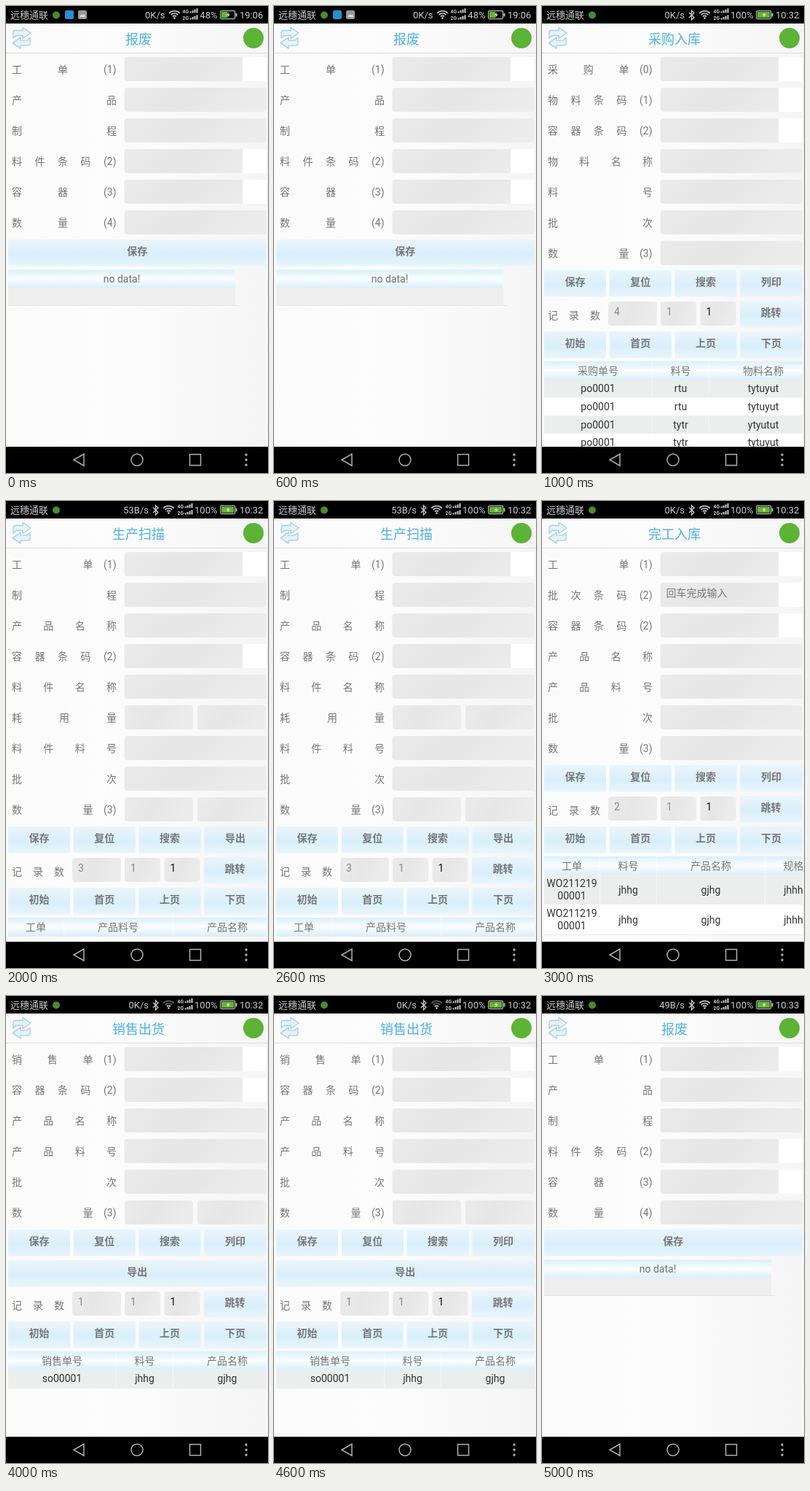
An HTML page for the animation above (6000 ms loop, 360 px wide and 640 px high).

```html
<!DOCTYPE html>
<html lang="zh-CN">
<head>
<meta charset="utf-8">
<title>移动仓库终端</title>
<style>
  html, body { margin: 0; width: 100%; height: 100%; overflow: hidden; background: #000; }
  svg { display: block; width: 360px; height: 640px; font: 14px Roboto, "Noto Sans CJK SC", "Noto Sans CJK", sans-serif; }
</style>
</head>
<body>
<svg id="stage" viewBox="0 0 360 640">
  <defs>
    <linearGradient id="page">
      <stop stop-color="#fafafa"/><stop offset=".35" stop-color="#fdfdfd"/><stop offset="1" stop-color="#f5f5f5"/>
    </linearGradient>
    <linearGradient id="field" x2="1" y2=".2">
      <stop stop-color="#ebebeb"/><stop offset=".5" stop-color="#e6e6e6"/><stop offset="1" stop-color="#ececec"/>
    </linearGradient>
    <linearGradient id="button" x2="0" y2="1">
      <stop stop-color="#ebf5fa"/><stop offset=".55" stop-color="#d9effb"/><stop offset="1" stop-color="#e9f5fb"/>
    </linearGradient>
    <linearGradient id="head" x2="0" y2="1">
      <stop stop-color="#d9f0fc"/><stop offset=".5" stop-color="#fbfdfe"/><stop offset="1" stop-color="#d9f0fc"/>
    </linearGradient>
    <clipPath id="tableClip"><path d="M2 24H358V604H2Z"/></clipPath>
  </defs>
</svg>
<script>
const ROW = 42, TOP = 66, SCENE_MS = 1000;
const rowY = i => TOP + ROW * i;

const rect = (x, y, w, h, fill, r = 0) =>
  `<rect x="${x}" y="${y}" width="${w}" height="${h}" rx="${r}" fill="${fill}"/>`;
const text = (x, y, str, fill = '#777', attrs = '') =>
  `<text x="${x}" y="${y}" fill="${fill}" ${attrs}>${str}</text>`;
const centered = (x, y, str, fill, attrs = '') =>
  text(x, y, str, fill, `text-anchor="middle" ${attrs}`);
const path = (d, attrs) => `<path d="${d}" ${attrs}/>`;

// Spreads characters evenly so the last one ends at `right`.
function spread(str, y, right) {
  const gap = (right - 8 - 14) / (str.length - 1);
  return [...str].map((c, i) => text(8 + gap * i, y, c)).join('');
}

function label(name, number, y, even) {
  if (!number) return spread(name, y, 152);
  const right = even || name.length === 4 ? 134 - (126 / name.length - 14) : 119.5;
  return spread(name, y, right) + text(134, y, `(${number})`);
}

const field = (x, y, w) => rect(x, y, w, 33, 'url(#field)', 4);
const fieldText = (x, y, str, fill = '#888') => text(x + 8, y + 19.3, str, fill);

// Row format: name, number, kind ("scan", "split" or none), value.
function formRow([name, number, kind, value], i, even) {
  const y = rowY(i) + 4;
  let out = label(name, number, y + 22.3, even);
  out += kind === 'split' ? field(163, y, 94) + field(263, y, 94) : field(162.5, y, 195);
  if (kind === 'scan') out += rect(325, y, 32.5, 33, '#fff');
  if (value) out += fieldText(162.5, y, value, '#777');
  return out;
}

function button(x, y, w, str) {
  return rect(x, y + 2, w, 36.5, 'url(#button)', 2) +
    centered(x + w / 2, y + 23.3, str, '#777', 'font-weight="bold"');
}
function buttons(names, i) {
  const w = names.length === 1 ? 354.5 : 85;
  return names.map((n, k) => button(3 + 89.8 * k, rowY(i), w, n)).join('');
}

function records(count, i) {
  const y = rowY(i);
  return spread('记录数', y + 26.5, 80) +
    [[91, 67, count], [163, 49, 1], [217.5, 49, 1, '#111']]
      .map(([x, w, n, color]) => field(x, y + 3, w) + fieldText(x, y + 3, n, color)).join('') +
    button(272, y, 85, '跳转');
}

function table({ columns, edges, rows, height = 24.7 }, i) {
  const y = rowY(i) + 1;
  let out = rect(3, y, 355, 25, 'url(#head)');
  columns.forEach(([x, name]) => out += centered(x, y + 18, name));
  rows.forEach((cells, r) => {
    const top = y + 25 + height * r;
    out += rect(3, top, 355, height, r % 2 ? '#fff' : '#eceeee');
    cells.forEach((cell, c) => {
      const lines = cell.split('\n');
      lines.forEach((line, k) => out += centered(columns[c][0],
        top + height / 2 + 5 + (k - (lines.length - 1) / 2) * 17, line, '#333'));
    });
  });
  const bottom = y + 25 + height * rows.length;
  edges.forEach(x => out += path(`M${x} ${y}V${bottom}`, 'stroke="#fff" stroke-opacity=".5"'));
  out += path(`M3 ${bottom + .5}H358`, 'stroke="#e4e8ea"');
  return `<g clip-path="url(#tableClip)">${out}</g>`;
}

const emptyTable = rect(3, 361.5, 312, 24.5, 'url(#head)') + rect(3, 386, 312, 24, '#eee') +
  path('M3 410.5H320', 'stroke="#e2e8ec"') + centered(159, 379, 'no data!', '#707070');

function wifi(x, weak) {
  const arc = r => path(`M${x - r * .72} ${17 - r * .72}A${r} ${r} 0 0 1 ${x + r * .72} ${17 - r * .72}`,
    `fill="none" stroke="${weak && r > 5 ? '#666' : '#ccc'}" stroke-width="1.7"`);
  return arc(10) + arc(6.8) + arc(3.6) + `<circle cx="${x}" cy="16.6" r="1.3" fill="#ccc"/>`;
}

function signal(x) {
  let out = '';
  [9.5, 18.5].forEach((y, row) => {
    out += text(x, y, row ? '2G' : '4G', '#ccc', 'font-size="6.8" font-weight="bold"');
    for (let k = 0; k < 4; k++)
      out += rect(x + 10 + k * 3, y - 2 - k * 1.4, 2, 2 + k * 1.4, '#ccc');
  });
  return out;
}

function statusBar({ speed, clock, charge = 100, weak }) {
  const full = charge === 100, size = 'font-size="13"';
  let out = rect(0, 0, 360, 24, '#000') + text(6, 17, '远穗通联', '#c8c8c8', size) +
    '<circle cx="69" cy="12.5" r="5" fill="#4c8a2c"/>';
  if (!full) out += rect(81, 6, 12, 12, '#2492d0', 2) + rect(99, 6, 12, 12, '#999', 2) +
    path('M101 15l3-4 2 2 1.5-1.5 2 3.5Z', 'fill="#ddd"');
  out += text(full ? 196 : 218.5, 17, speed, '#ccc', size + ' text-anchor="end"');
  if (full) out += path('M202 9l7 6.5-3.5 3.5V6l3.5 3.5-7 6.5', 'fill="none" stroke="#ccc" stroke-width="1.3"');
  out += wifi(full ? 223.5 : 231.5, weak) + signal(full ? 235.5 : 242.5);
  out += text(290.5, 17, charge + '%', '#ccc', size + ' text-anchor="end"');
  out += '<rect x="294.6" y="6.6" width="20" height="11" rx="1.5" fill="none" stroke="#bbb" stroke-width="1.2"/>' +
    rect(315.5, 10, 2, 4.5, '#bbb') + rect(296, 8, 17.2 * charge / 100, 8.2, '#62b532') +
    path('M306 8.5l-3.5 4.2h2.5l-1 3 4-4.2h-2.5Z', 'fill="#d5ecc4"');
  return out + text(321, 17, clock, '#ccc', size);
}

const arrow = 'M10 44V36.5Q10 33.5 13 33.5H23V29.5L34 37 23 44.5V40.5H14Z';
const swapIcon = `<g fill="#e6f2f9" stroke="#a5cfe8" stroke-width="1.3" stroke-linejoin="round">
  <path d="${arrow}"/><path d="${arrow}" transform="rotate(180 21.5 43.8)"/></g>`;

const navBar = rect(0, 604, 360, 36, '#000') +
  `<g fill="none" stroke="#b0b0b0" stroke-width="1.5">
    <path d="M93 622L107 614V630Z"/><circle cx="180" cy="622" r="8"/><path d="M252.5 614.5H267.5V629.5H252.5Z"/></g>` +
  [615, 622, 629].map(y => `<circle cx="330" cy="${y}" r="1.7" fill="#b0b0b0"/>`).join('');

function screen(s) {
  let i = s.rows.length;
  let out = rect(0, 24, 360, 580, 'url(#page)') + rect(0, 64, 360, 1, '#dcdcdc') + swapIcon +
    centered(182, 51.5, s.title, '#4fb0e6', 'font-size="18"') +
    '<circle cx="340" cy="44" r="14" fill="#5cb336"/>';
  out += s.rows.map((r, k) => formRow(r, k, s.even)).join('');
  s.actions.forEach(names => out += buttons(names, i++));
  if (s.table) {
    out += records(s.count, i++) + buttons(['初始', '首页', '上页', '下页'], i++) + table(s.table, i);
  } else out += emptyTable;
  return out + navBar + statusBar(s.status);
}

const actions = last => ['保存', '复位', '搜索', last];
const idle = { speed: '0K/s', clock: '10:32' };
const scrap = {
  title: '报废', even: true, actions: [['保存']],
  rows: [['工单', 1, 'scan'], ['产品'], ['制程'], ['料件条码', 2, 'scan'], ['容器', 3, 'scan'], ['数量', 4]]
};

const screens = [
  { ...scrap, status: { speed: '0K/s', clock: '19:06', charge: 48 } },
  {
    title: '采购入库', status: idle, count: 4, actions: [actions('列印')],
    rows: [['采购单', '0', 'scan'], ['物料条码', 1, 'scan'], ['容器条码', 2, 'scan'],
      ['物料名称'], ['料号'], ['批次'], ['数量', 3]],
    table: {
      columns: [[77, '采购单号'], [190.5, '料号'], [304, '物料名称']], edges: [151.5, 229.5],
      rows: ['rtu tytuyut', 'rtu tytuyut', 'tytr ytyutut', 'tytr tytuyut'].map(r => ['po0001', ...r.split(' ')])
    }
  },
  {
    title: '生产扫描', status: { ...idle, speed: '53B/s' }, count: 3, actions: [actions('导出')],
    rows: [['工单', 1, 'scan'], ['制程'], ['产品名称'], ['容器条码', 2, 'scan'], ['料件名称'],
      ['耗用量', 0, 'split'], ['料件料号'], ['批次'], ['数量', 3, 'split']],
    table: { columns: [[41, '工单'], [154, '产品料号'], [304, '产品名称']], edges: [79.5, 229.5], rows: [] }
  },
  {
    title: '完工入库', status: idle, count: 2, actions: [actions('列印')],
    rows: [['工单', 1, 'scan'], ['批次条码', 2, 'scan', '回车完成输入'], ['容器条码', 2, 'scan'],
      ['产品名称'], ['产品料号'], ['批次'], ['数量', 3]],
    table: {
      columns: [[41, '工单'], [118.5, '料号'], [232, '产品名称'], [345.5, '规格']], edges: [79.5, 157.5, 306.5],
      height: 41, rows: Array(2).fill(['WO211219\n00001', 'jhhg', 'gjhg', 'jhhh'])
    }
  },
  {
    title: '销售出货', status: { ...idle, weak: true }, count: 1, actions: [actions('列印'), ['导出']],
    rows: [['销售单', 1, 'scan'], ['容器条码', 2, 'scan'], ['产品名称'], ['产品料号'], ['批次'], ['数量', 3, 'split']],
    table: {
      columns: [[77, '销售单号'], [190.5, '料号'], [304, '产品名称']], edges: [151.5, 229.5],
      rows: [['so00001', 'jhhg', 'gjhg']]
    }
  },
  { ...scrap, status: { speed: '49B/s', clock: '10:33' } }
];

const stage = document.getElementById('stage');
stage.insertAdjacentHTML('beforeend', screens.map(s => `<g class="screen">${screen(s)}</g>`).join(''));
const layers = [...stage.querySelectorAll('.screen')];
const start = performance.now();

function draw() {
  const elapsed = performance.now() - start;
  const current = Math.floor(elapsed / SCENE_MS) % layers.length;
  layers.forEach((g, i) => g.style.display = i === current ? '' : 'none');
  requestAnimationFrame(draw);
}
draw();
</script>
</body>
</html>
```
